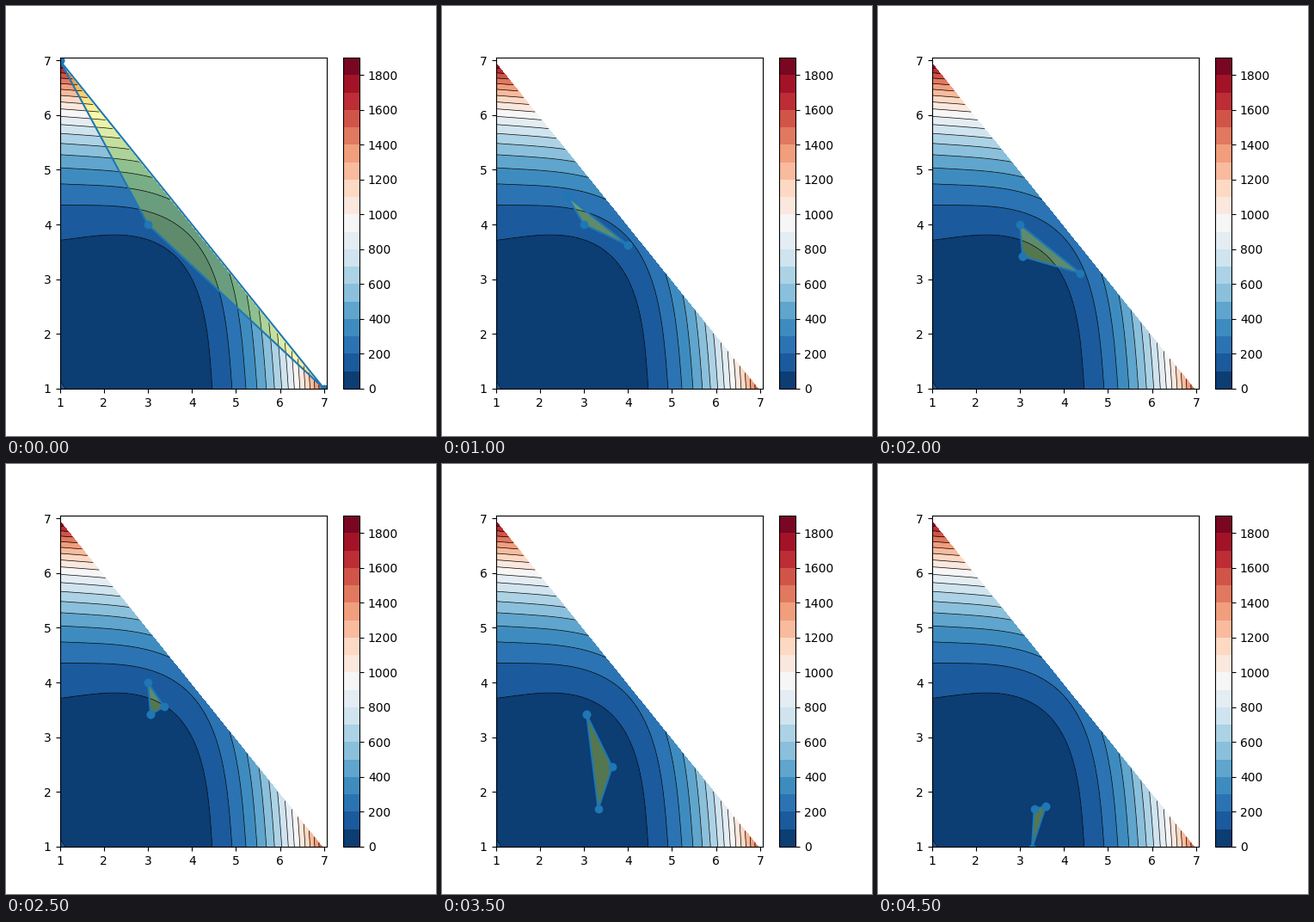
A matplotlib script for the animation above (5 s loop, 500x500 px).

```python
import numpy as np
import matplotlib.pyplot as plt
from matplotlib.animation import FuncAnimation

STEPS = 10
INTERVAL = 500
EXPAND, CONTRACT = 2.0, 0.25


def himmelblau(x, y):
    return (x**2 + y - 11)**2 + (x + y**2 - 7)**2


def next_simplex(simplex):
    """One Nelder-Mead step: replace the worst vertex."""
    values = [himmelblau(*p) for p in simplex]
    worst = int(np.argmax(values))
    best, second, highest = sorted(values)
    center = np.delete(simplex, worst, axis=0).mean(axis=0)
    away = center - simplex[worst]

    reflected = himmelblau(*(center + away))
    if reflected < best:
        expanded = himmelblau(*(center + EXPAND * away))
        scale = EXPAND if expanded < reflected else 1.0
    elif reflected < second:
        scale = 1.0
    elif reflected < highest:
        scale = CONTRACT
    else:
        scale = -CONTRACT

    result = simplex.copy()
    result[worst] = center + scale * away
    return result


path = [np.array([[1.0, 7.0], [3.0, 4.0], [7.0, 1.0]])]
while len(path) < STEPS:
    path.append(next_simplex(path[-1]))

fig, ax = plt.subplots(figsize=(5, 5), dpi=100)

# Surface, limited to x + y <= 8
axis = np.arange(1, 7.1, 0.05)
x, y = np.meshgrid(axis, axis)
z = np.ma.masked_where(x + y > 8, himmelblau(x, y))
levels = np.arange(0, 2000, 100)
surface = ax.contourf(x, y, z, levels=levels, cmap="RdBu_r")
ax.contour(x, y, z, levels=levels, colors="black", linewidths=0.5)
fig.colorbar(surface, ax=ax, ticks=levels[::2])

fill, = ax.fill(*path[0].T, facecolor="yellow", edgecolor="none", alpha=0.3)
outline, = ax.plot([], [], "o-", color="C0")
ax.set_xlim(axis[0], axis[-1])
ax.set_ylim(axis[0], axis[-1])


def draw(i):
    simplex = path[i]
    fill.set_xy(simplex)
    outline.set_data(*np.vstack([simplex, simplex[:1]]).T)
    return fill, outline


anim = FuncAnimation(fig, draw, frames=STEPS, interval=INTERVAL, repeat=True)
plt.show()
```
